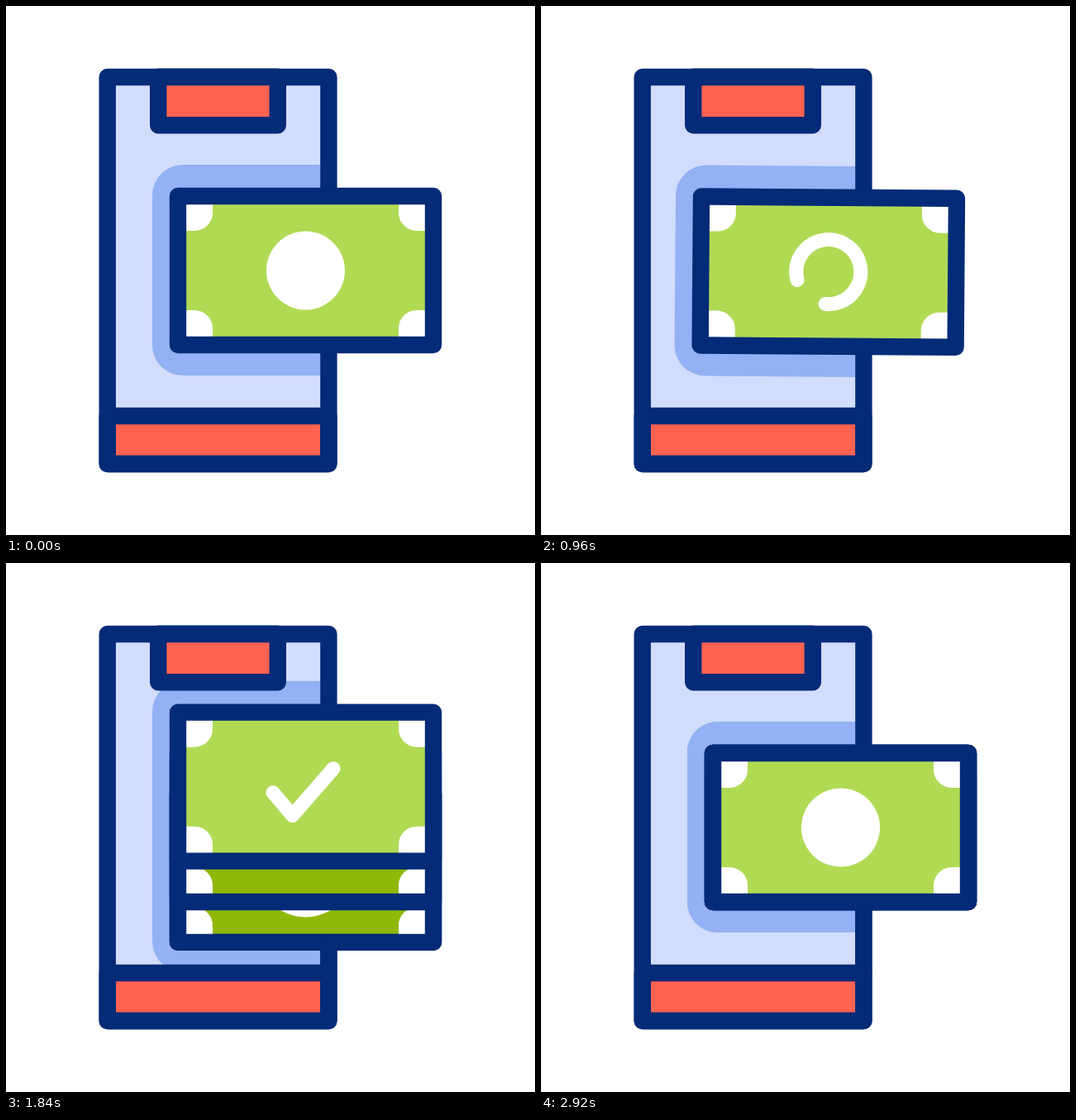
These frames come from a looping animation (640x640 px, 3000 ms). An HTML page:

```html
<!DOCTYPE html>
<html lang="en">
<head>
<meta charset="utf-8">
<title>Mobile payment</title>
<style>
  html, body { margin: 0; width: 100%; height: 100%; overflow: hidden; background: #fff; }
  svg { display: block; width: 100vw; height: 100vh; }
  .line { stroke: #032b77; stroke-width: 20.4; stroke-linejoin: round; }
  .white { fill: none; stroke: #fff; stroke-width: 17; stroke-linecap: round; stroke-linejoin: round; }
</style>
</head>
<body>
<svg viewBox="0 0 640 640">
  <defs>
    <clipPath id="screen"><rect x="132.5" y="96" width="248" height="390"/></clipPath>
    <clipPath id="slot"><rect x="132.7" y="86" width="507" height="410"/></clipPath>
    <path id="corner" fill="#fff" d="M-154.5 -48h20a22 22 0 0 0 22 -22v-20h-42z"/>
    <g id="bill">
      <rect x="-154.5" y="-90" width="309" height="180"/>
      <use href="#corner"/>
      <use href="#corner" transform="scale(-1 1)"/>
      <use href="#corner" transform="scale(1 -1)"/>
      <use href="#corner" transform="scale(-1 -1)"/>
      <rect class="line" fill="none" x="-154.5" y="-90" width="309" height="180"/>
    </g>
    <rect id="shade" x="-185.5" y="-128" width="381" height="255" rx="37" fill="#93b1f4"/>
  </defs>

  <rect x="122.5" y="86" width="268" height="468" fill="#d2dcfd"/>
  <g clip-path="url(#screen)">
    <use id="lowShade" href="#shade"/>
    <use id="midShade" href="#shade"/>
    <use id="mainShade" href="#shade"/>
    <use id="oldShade" href="#shade"/>
  </g>
  <g class="line">
    <rect x="122.7" y="496" width="267.7" height="58" fill="#ff6250"/>
    <rect x="184.2" y="85.7" width="144.6" height="58.5" fill="#ff6250"/>
    <rect x="122.7" y="86" width="267.7" height="468" fill="none"/>
  </g>

  <g clip-path="url(#slot)">
    <g id="low"><use href="#bill" fill="#90b808"/><circle r="59.5" fill="#fff" id="lowDisc"/>
      <use href="#bill" fill="none"/></g>
    <path id="edge" class="line" fill="none"/>
    <g id="mid"><use href="#bill" fill="#90b808"/></g>
    <g id="main">
      <use href="#bill" fill="#b0da53"/>
      <circle id="ring" class="white" pathLength="360"/>
      <path id="check" class="white" pathLength="100" d="M-39.5 7L-16 35L33.5 -22"/>
    </g>
    <g id="old"><use href="#bill" fill="#b0da53"/><circle r="47.5" fill="#fff"/></g>
  </g>
</svg>
<script>
const LOOP = 3000, CX = 362.5, CY = 320, TRAVEL = 667, SPREAD = 51.5;
const el = id => document.getElementById(id);
const clamp = v => Math.min(1, Math.max(0, v));

// Cubic timing curve through (0,0), (x1,0), (x2,1), (1,1).
function curve(x1, x2) {
  return u => {
    let lo = 0, hi = 1;
    for (let i = 0; i < 24; i++) {
      const s = (lo + hi) / 2, r = 1 - s;
      if (3 * r * r * s * x1 + 3 * r * s * s * x2 + s * s * s < u) lo = s; else hi = s;
    }
    return lo * lo * (3 - 2 * lo);
  };
}
const slide = curve(.75, .12), open = curve(.2, .2), close = curve(.46, .3), soft = curve(1 / 3, 2 / 3);
const phase = (t, from, to, ease = soft) => {
  const u = clamp((t - from) / (to - from));
  return u <= 0 ? 0 : u >= 1 ? 1 : ease(u);
};

function place(name, x, y, angle = 0) {
  el(name).setAttribute('transform', `translate(${CX + x} ${CY + y}) rotate(${angle})`);
}
function show(name, on) {
  el(name).style.display = on ? '' : 'none';
}
function setRing(inner, start, length) {
  const ring = el('ring');
  ring.setAttribute('r', (47.5 + inner) / 2);
  ring.style.strokeWidth = 47.5 - inner;
  ring.style.strokeDasharray = length >= 359.5 ? 'none' : `${length} 720`;
  ring.setAttribute('transform', `rotate(${start})`);
  show('ring', length > 0.5);
}

function drawMark(t) {
  if (t < 1700) {
    const length = 290 * phase(t, 620, 960) * (1 - phase(t, 970, 1290));
    setRing(30.5, 165 + (t - 960) * .35, length);
  } else {
    setRing(30.5 * (1 - phase(t, 2480, 2840)), 13, 360 * phase(t, 2140, 2500));
  }
  const head = 100 * phase(t, 1260, 1680), tail = 100 * phase(t, 1960, 2220);
  el('check').style.strokeDasharray = `0 ${tail} ${head - tail} 200`;
  show('check', head - tail > 0.5);
}

function render(t) {
  const p = phase(t, 0, 1200, slide);
  const back = SPREAD * (1 - phase(t, 2120, 2900, close));
  const up = back * phase(t, 1160, 2080, open);
  const down = back * phase(t, 1240, 2080, open);
  const lag = back * phase(t, 1360, 2080, open);

  // The first bill slips into the phone while the next one swings out.
  const inX = -TRAVEL * (1 - p), inY = -.12 * inX - .00059 * inX * inX;
  const outX = -TRAVEL * p, outY = .12 * outX + .00118 * outX * outX;
  for (const part of ['', 'Shade']) {
    place('main' + part, inX, inY - up, -.0295 * inX);
    place('old' + part, outX, outY, .047 * outX);
    show('old' + part, t < 1100);
    show('mid' + part, t > 1200);
    show('low' + part, t > 1200);
    place('mid' + part, 0, 0);
  }
  place('low', 0, down);
  place('lowShade', 0, lag);
  el('edge').setAttribute('d', `M390.4 ${408 + lag}V496`);
  show('edge', t > 1200);
  drawMark(t);
}

const begin = performance.now();
function tick() {
  const t = (performance.now() - begin) % LOOP;
  render(Math.floor(t / 40) * 40);
  requestAnimationFrame(tick);
}
render(0);
requestAnimationFrame(tick);
</script>
</body>
</html>
```
